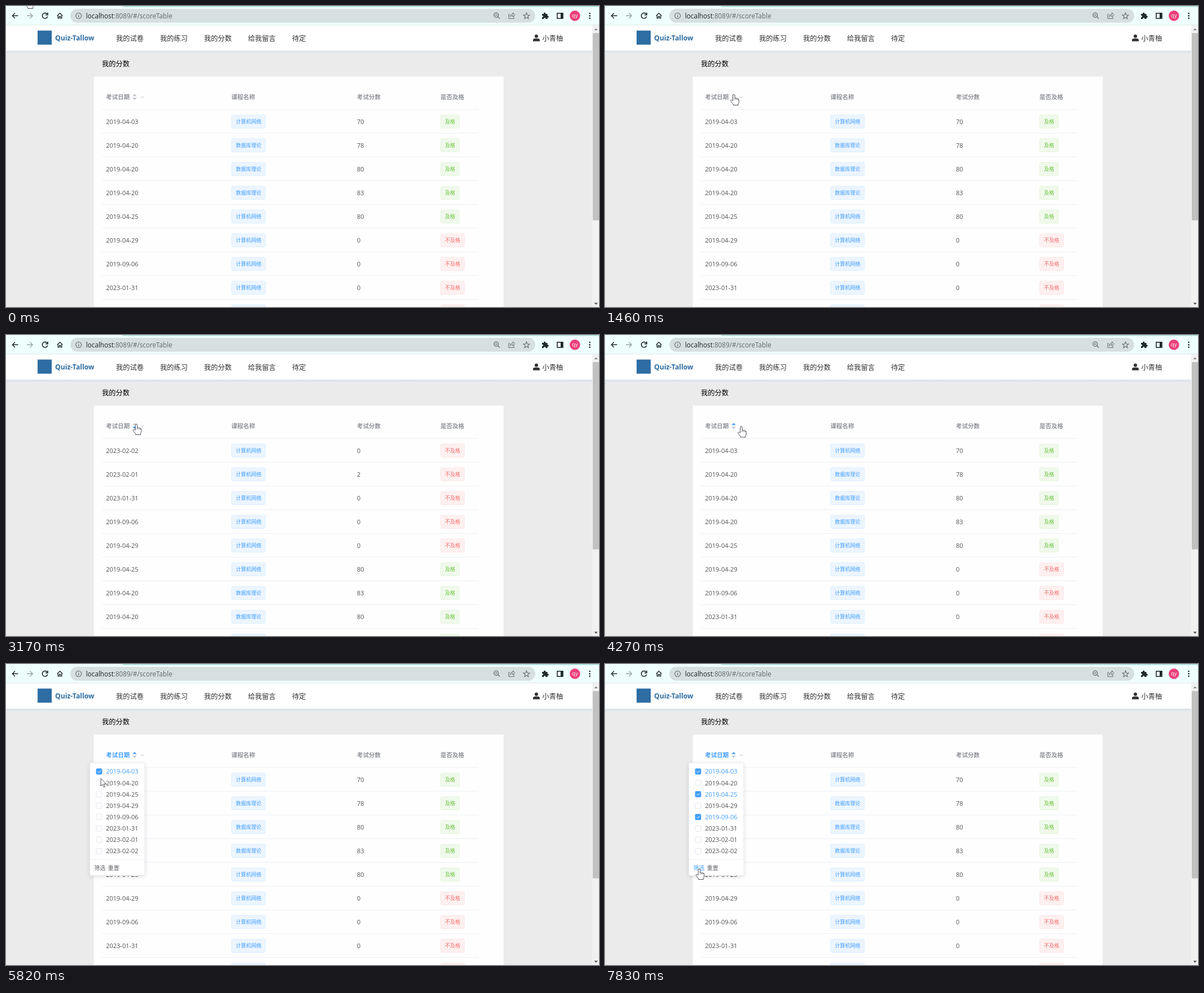
Animation, 1051 px wide and 533 px high, one loop 8000 ms. Source, as an HTML page:

```html
<!DOCTYPE html>
<html lang="zh-CN">
<head>
<meta charset="utf-8">
<title>我的分数</title>
<style>
  html, body { margin: 0; width: 100%; height: 100%; overflow: hidden; background: #ebebeb; }
  svg { display: block; position: absolute; left: 0; top: 0; }
  text { font-family: "Open Sans", "Noto Sans CJK SC", "Noto Sans CJK", sans-serif; white-space: pre; }
</style>
</head>
<body>
<svg id="stage" width="1051" height="533" viewBox="0 0 1051 533">
  <defs>
    <linearGradient id="fade" x1="0" y1="0" x2="0" y2="1">
      <stop offset="0" stop-color="#d9e4ec"/><stop offset="1" stop-color="#ebebeb"/>
    </linearGradient>
    <filter id="soft" x="-20%" y="-20%" width="140%" height="140%">
      <feDropShadow dx="0" dy="1.5" stdDeviation="3.5" flood-color="#000" flood-opacity=".13"/>
    </filter>
  </defs>
  <g id="page"></g>
  <g id="rows"></g>
  <g id="head"></g>
  <g id="menu"></g>
  <g id="chrome"></g>
  <g id="pointer"></g>
</svg>
<script>
const LOOP = 8000;
const BLUE = '#409eff', GREY = '#c0c4cc', INK = '#303133', BODY = '#505255';
const $ = id => document.getElementById(id);

function add(parent, tag, attrs, content) {
  const node = document.createElementNS('http://www.w3.org/2000/svg', tag);
  for (const key in attrs) node.setAttribute(key, attrs[key]);
  if (content !== undefined) node.textContent = content;
  parent.appendChild(node);
  return node;
}
const rect = (p, x, y, width, height, fill, more) =>
  add(p, 'rect', { x, y, width, height, fill, ...more });
const path = (p, d, stroke, more) =>
  add(p, 'path', { d, stroke, fill: 'none', 'stroke-width': 1.4, ...more });
// y is the vertical centre of the glyphs
const label = (p, x, y, str, size, fill, more) =>
  add(p, 'text', { x, y: y + size * .37, 'font-size': size, fill, ...more }, str);

function drawPage() {
  const p = $('page');
  rect(p, 0, 0, 1051, 533, '#ebebeb');
  rect(p, 0, 79, 1039, 6, 'url(#fade)');
  rect(p, 0, 34, 1039, 45, '#fff');
  rect(p, 56, 43.5, 25, 25, '#2d6da3');
  label(p, 87, 56.5, 'Quiz-Tallow', 12.2, '#2d6da3', { 'font-weight': 700 });
  ['我的试卷', '我的练习', '我的分数', '给我留言', '待定'].forEach((item, i) =>
    label(p, 195 + 78 * i, 57, item, 12.25, INK));
  add(p, 'circle', { cx: 940, cy: 53.5, r: 3, fill: INK });
  add(p, 'path', { d: 'M934 62.5v-1.5q0-3.4 3.6-3.4h4.8q3.6 0 3.6 3.4v1.5z', fill: INK });
  label(p, 950.5, 57, '小青柚', 12.25, INK);
  label(p, 170, 102.5, '我的分数', 12.25, '#000');
  rect(p, 155.5, 125, 726.5, 408, '#fefefe');

  rect(p, 1039, 34, 12, 499, '#f1f1f1');
  rect(p, 1040, 48, 11, 331.5, '#c1c1c1');
  add(p, 'path', { d: 'M1042.5 43l3.2-3.5 3.2 3.5z', fill: '#8a8a8a' });
  add(p, 'path', { d: 'M1042.5 525.5l3.2 3.5 3.2-3.5z', fill: '#505050' });
}

function drawChrome() {
  const p = $('chrome'), dark = '#1f2a2c', mid = '#5f6b6d';
  rect(p, 0, 0, 1051, 34, '#effffd');
  rect(p, 206, 0, 845, 1.6, '#a9deda');
  rect(p, 0, 33.4, 1051, .8, '#d8e2e1');
  path(p, 'M21.5 17.2H11.5M16 12.5l-4.7 4.7 4.7 4.7', dark);
  path(p, 'M37 17.2h10M42.5 12.5l4.7 4.7-4.7 4.7', '#9aa5a6');
  path(p, 'M73 14.2a4.8 4.8 0 1 0 .8 4.4M74 11.8v3.9h-4', dark, { 'stroke-width': 1.6 });
  path(p, 'M90.8 17.3l4.7-4.6 4.7 4.6M92.2 16.5v5.2h2.2v-3.2h2.2v3.2h2.2v-5.2', dark, { 'stroke-width': 1.3 });
  rect(p, 114, 5, 824, 24.5, '#d6e0e0', { rx: 12.25 });
  add(p, 'circle', { cx: 128.7, cy: 17.3, r: 5, fill: 'none', stroke: mid, 'stroke-width': 1.1 });
  path(p, 'M128.7 16.6v3.4M128.7 14.4v1.2', mid, { 'stroke-width': 1.2 });
  const url = label(p, 141.8, 17.2, '', 11.7, mid);
  add(url, 'tspan', { fill: '#1c2426' }, 'localhost');
  add(url, 'tspan', {}, ':8089/#/scoreTable');

  add(p, 'circle', { cx: 868.8, cy: 16, r: 3.9, fill: 'none', stroke: mid, 'stroke-width': 1.3 });
  path(p, 'M871.6 18.8l3.6 3.6M867 16h3.6', mid, { 'stroke-width': 1.3 });
  path(p, 'M893 14.8h-2v7.4h9.4v-2.5M893.5 19q.5-4.6 5-4.6v-2.6l3.6 3.9-3.6 3.8v-2.6q-3.2-.2-5 2.1z', mid, { 'stroke-width': 1 });
  const star = Array.from({ length: 10 }, (_, i) => {
    const a = Math.PI * (i / 5 - .5), r = i % 2 ? 2.5 : 5.8;
    return `${922.5 + r * Math.cos(a)},${17.8 + r * Math.sin(a)}`;
  });
  add(p, 'polygon', { points: star.join(' '), fill: 'none', stroke: mid, 'stroke-width': 1.1 });
  add(p, 'path', {
    d: 'M950 14h3v-.8a1.6 1.6 0 0 1 3.4 0v.8h3.2v3.2h.6a1.6 1.6 0 0 1 0 3.4h-.6V23h-3.2v-.6a1.5 1.5 0 0 0-3.2 0v.6H950v-3.2h.6a1.5 1.5 0 0 0 0-3H950z',
    fill: dark
  });
  rect(p, 977, 12.8, 10, 9.2, 'none', { stroke: dark, 'stroke-width': 1.6 });
  rect(p, 983, 12.8, 4, 9.2, dark);
  add(p, 'circle', { cx: 1008.3, cy: 17.3, r: 9.2, fill: '#ec407a' });
  label(p, 1008.3, 16.6, 'qy', 9.5, '#fff', { 'text-anchor': 'middle' });
  [13, 17.3, 21.6].forEach(cy => add(p, 'circle', { cx: 1034.6, cy, r: 1.35, fill: dark }));
}

const NET = '计算机网络', DATA = '数据库理论';
const SCORES = [
  ['2019-04-03', NET, 70], ['2019-04-20', DATA, 78], ['2019-04-20', DATA, 80],
  ['2019-04-20', DATA, 83], ['2019-04-25', NET, 80], ['2019-04-29', NET, 0],
  ['2019-09-06', NET, 0], ['2023-01-31', NET, 0], ['2023-02-01', NET, 2],
  ['2023-02-02', NET, 0]
];
const DATES = [...new Set(SCORES.map(s => s[0]))];

function tag(p, x, cy, width, str, [fill, stroke, ink]) {
  rect(p, x + .5, cy - 11.7, width - 1, 23.4, fill, { rx: 2.5, stroke, 'stroke-width': .8 });
  label(p, x + 8, cy - .2, str, 9, ink);
}
const TAG_BLUE = ['#ecf5ff', '#d9ecff', BLUE];
const TAG_GREEN = ['#f0f9eb', '#e1f3d8', '#67c23a'];
const TAG_RED = ['#fef0f0', '#fde2e2', '#f56c6c'];

function table(descending) {
  const g = add($('rows'), 'g', {});
  const list = descending ? SCORES.slice().reverse() : SCORES;
  list.slice(0, 9).forEach(([date, course, score], i) => {
    const cy = 204.6 + 42.05 * i;
    label(g, 177.2, cy + .3, date, 11, BODY);
    tag(g, 399.4, cy, 60.8, course, TAG_BLUE);
    label(g, 622, cy + .3, score, 11, BODY);
    if (score >= 60) tag(g, 770, cy, 34, '及格', TAG_GREEN);
    else tag(g, 770, cy, 43, '不及格', TAG_RED);
    rect(g, 170, cy - 22, 667, .9, '#ebeef5');
  });
  return g;
}

function drawHead() {
  const p = $('head');
  const title = (x, str) => label(p, x, 161, str, 10.5, '#909399', { 'font-weight': 700 });
  const first = title(177.3, '考试日期');
  title(399.5, '课程名称');
  title(622, '考试分数');
  title(770, '是否及格');
  const up = add(p, 'path', { d: 'M224.2 159.6l3.8-3.9 3.8 3.9z' });
  const down = add(p, 'path', { d: 'M224.2 162.3l3.8 3.9 3.8-3.9z' });
  path(p, 'M239 160.2l2.6 2.5 2.6-2.5', '#a8abb2', { 'stroke-width': .9 });
  return { first, up, down };
}

function drawMenu() {
  const p = $('menu');
  rect(p, 148.6, 175.2, 97.2, 199.4, '#fff', { rx: 1.5, stroke: '#e6e9f0', 'stroke-width': .8, filter: 'url(#soft)' });
  const items = DATES.map((date, i) => {
    const cy = 190.3 + 20.15 * i;
    return {
      date,
      box: rect(p, 160, cy - 5, 10, 10, '#fff', { rx: 1.5, 'stroke-width': .8 }),
      tick: path(p, `M162.4 ${cy}l2 2 3.4-3.8`, '#fff', { 'stroke-width': 1 }),
      text: label(p, 177.2, cy, date, 11, BODY)
    };
  });
  rect(p, 149, 345.6, 96.4, .9, '#ebeef5');
  const apply = label(p, 156.4, 361, '筛选', 10, GREY);
  label(p, 180.7, 361, '重置', 10, '#606266');
  return { items, apply };
}

function drawPointers() {
  const p = $('pointer');
  const style = { fill: '#fff', 'stroke-width': .9, 'stroke-linejoin': 'round' };
  const hand = add(p, 'g', {});
  path(hand, 'M-1.7 10.5V1.5a1.7 1.7 0 0 1 3.4 0V6.5q1.6-1.2 2.8.3 1.5-.8 2.5.6 1.8-.2 1.8 1.8V12.5q0 2-1.3 3.6V18.5H-1.2V17L-5.4 11.8q-.9-1.6.4-2.3 1.2-.4 2.2.8z', '#3d3a47', style);
  path(hand, 'M1.7 6.5V9.5M4.5 6.8V9.6M7 7.4V9.8', '#3d3a47', { 'stroke-width': .7 });
  const arrow = path(p, 'M0 0V13.6l3.1-2.9 2.3 5 2.1-1-2.3-4.8h4.4z', '#3d3a47', style);
  return { hand, arrow };
}

// [time, pointer x, pointer y, changes]
const STEPS = [
  [0, 40, -14, { sort: '', open: 0, checked: 0, apply: GREY, arrow: 0 }],
  [140, 120, 18, { arrow: 1 }],
  [360, 298, 112],
  [580, 272, 146],
  [800, 240, 164],
  [1020, 229, 166],
  [1240, 228, 160, { arrow: 0 }],
  [1460, 228.5, 157],
  [1680, 229, 157],
  [1900, 230, 157, { sort: 'up' }],
  [2100, 231, 157.5],
  [2320, 231, 157.5, { sort: 'down' }],
  [2540, 231, 158],
  [2970, 231, 157.5],
  [3170, 231, 158],
  [3390, 231, 158, { sort: 'up' }],
  [3830, 235, 160],
  [4050, 240, 162],
  [4270, 241.5, 162.5],
  [4480, 243, 163, { open: 1 }],
  [4690, 244.5, 163.5],
  [4920, 240, 166, { arrow: 1 }],
  [5140, 205, 180, { arrow: 0 }],
  [5360, 170, 188],
  [5600, 166, 190, { checked: 1, apply: '#606266' }],
  [5820, 168, 202.5, { arrow: 1 }],
  [6040, 167, 212, { arrow: 0 }],
  [6260, 166, 226],
  [6480, 166, 229, { checked: 2 }],
  [6700, 166, 252],
  [6930, 166, 269],
  [7150, 166, 270, { checked: 3 }],
  [7370, 167, 306],
  [7600, 167, 346],
  [7830, 167, 363, { apply: BLUE }]
];
const PICKS = ['2019-04-03', '2019-04-25', '2019-09-06'];

drawPage();
drawChrome();
const ascending = table(false), descending = table(true);
const head = drawHead(), menu = drawMenu(), pointer = drawPointers();
const show = (node, on) => node.setAttribute('display', on ? 'inline' : 'none');
const paint = (node, fill) => node.setAttribute('fill', fill);

let state = {};
const timeline = STEPS.map(([at, x, y, change]) => {
  state = { ...state, ...change };
  return { at, x, y, ...state };
});

function render(s) {
  show(ascending, s.sort !== 'down');
  show(descending, s.sort === 'down');
  paint(head.up, s.sort === 'up' ? BLUE : GREY);
  paint(head.down, s.sort === 'down' ? BLUE : GREY);
  paint(head.first, s.checked ? BLUE : '#909399');
  show($('menu'), s.open);
  paint(menu.apply, s.apply);
  const picked = PICKS.slice(0, s.checked);
  for (const { date, box, tick, text } of menu.items) {
    const on = picked.includes(date);
    paint(box, on ? BLUE : '#fff');
    box.setAttribute('stroke', on ? BLUE : '#dcdfe6');
    show(tick, on);
    paint(text, on ? BLUE : BODY);
  }
  show(pointer.hand, !s.arrow);
  show(pointer.arrow, s.arrow);
  $('pointer').setAttribute('transform', `translate(${s.x} ${s.y})`);
}

let current;
function tick() {
  const t = performance.now() % LOOP;
  const step = timeline.findLast(s => s.at <= t);
  if (step !== current) render(current = step);
  requestAnimationFrame(tick);
}
tick();
</script>
</body>
</html>
```
